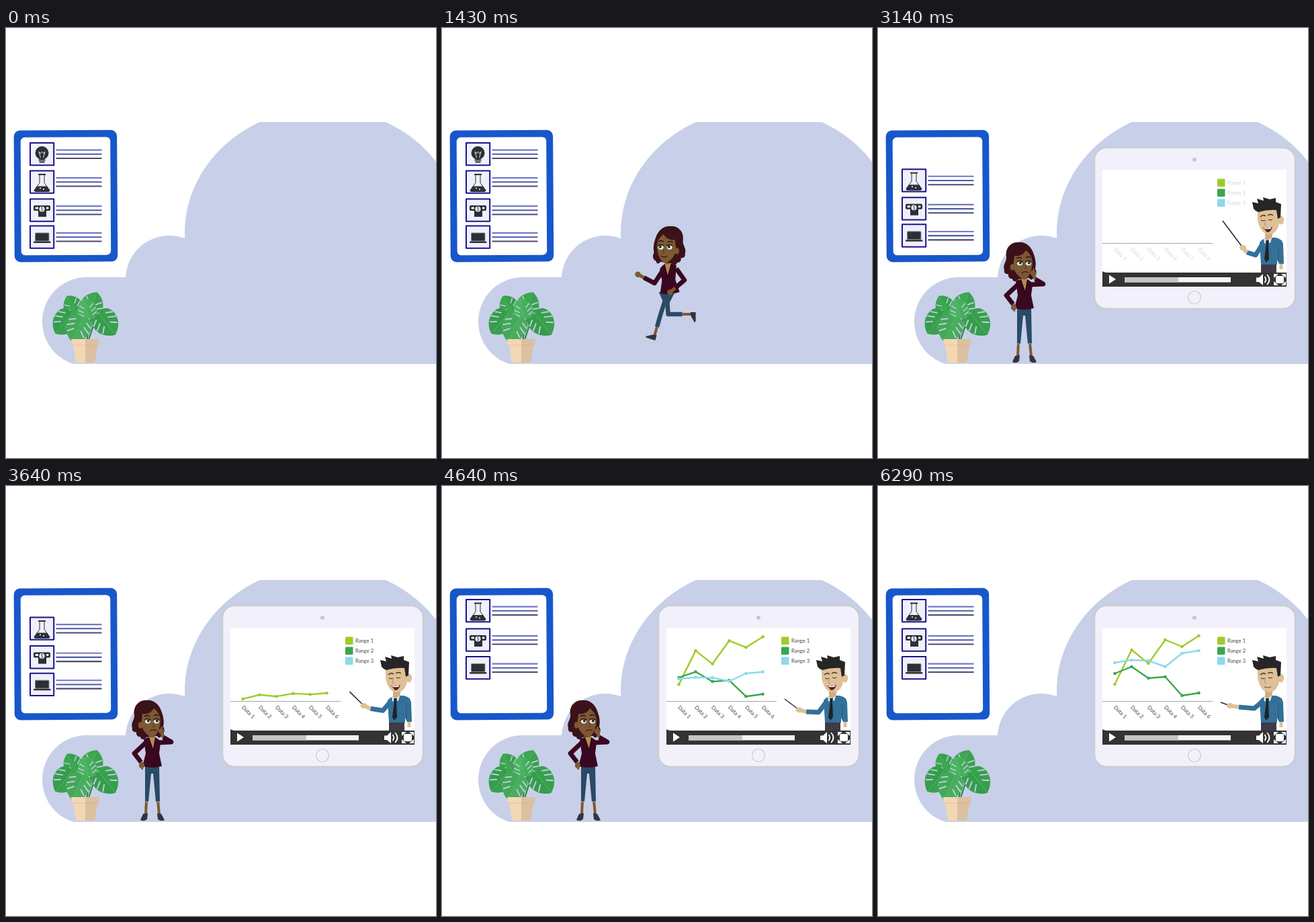
Recreate the animation shown at these times as an HTML page with a canvas. Size 640 by 640 pixels, loop 6.43 s.

```html
<!DOCTYPE html>
<html lang="en">
<head>
<meta charset="utf-8">
<style>
html, body { margin: 0; height: 100%; overflow: hidden; background: #fff; }
canvas { display: block; width: 640px; height: 640px; }
</style>
</head>
<body>
<canvas width="640" height="640"></canvas>
<script>
const LOOP = 6430;
const g = document.querySelector('canvas').getContext('2d');
const CLOUD = '#c7d0e8', INK = '#2b3036', SKIN = '#7d5833', JACKET = '#3a0720',
  JEANS = '#2a4a66', SHOE = '#33343d', HAIR = '#3b1219', SHIRT = '#33709a', TAN = '#dfc097';

const clamp = v => Math.max(0, Math.min(1, v));
const part = (t, from, to) => clamp((t - from) / (to - from));
const smooth = u => (1 - Math.cos(Math.PI * u)) / 2;
const outQuad = u => 1 - (1 - u) ** 2;
const mix = (a, b, u) => Array.isArray(a) ? a.map((v, i) => mix(v, b[i], u)) : a + (b - a) * u;

function fill(d, color) { g.fillStyle = color; g.fill(new Path2D(d)); }
function stroke(d, color, width = 1) {
  g.strokeStyle = color; g.lineWidth = width; g.stroke(new Path2D(d));
}
const limb = (points, color, width) => stroke('M' + points.join('L'), color, width);
function oval(x, y, rx, ry, color) {
  g.beginPath(); g.ellipse(x, y, rx, ry, 0, 0, 7); g.fillStyle = color; g.fill();
}
function box(x, y, w, h, r, color, line, width) {
  g.beginPath(); g.roundRect(x, y, w, h, r);
  if (color) { g.fillStyle = color; g.fill(); }
  if (line) { g.strokeStyle = line; g.lineWidth = width; g.stroke(); }
}
function label(text, x, y, size, color) {
  g.font = size + 'px Lato, sans-serif'; g.fillStyle = color; g.fillText(text, x, y);
}
function at(x, y, draw, { turn = 0, sx = 1, sy = sx, alpha = 1 } = {}) {
  g.save();
  g.translate(x, y); g.rotate(turn * Math.PI / 180); g.scale(sx, sy);
  g.globalAlpha *= alpha;
  draw();
  g.restore();
}
// Interpolates between [time, pose] keys, easing each step.
function poseAt(t, keys) {
  let i = 0;
  while (i < keys.length - 2 && t > keys[i + 1][0]) i++;
  const [a, b] = [keys[i], keys[i + 1]];
  return mix(a[1], b[1], smooth(part(t, a[0], b[0])));
}

function cloud() {
  oval(471.5, 305, 205.5, 185.5, CLOUD);
  oval(243, 374, 65, 65, CLOUD);
  oval(120, 437, 66, 66, CLOUD);
  g.fillRect(120, 371, 520, 129);
}

function leaf(color) {
  fill('M0 0C-8 5-18 0-18-13C-18-26-9-34 0-38C9-34 18-26 18-13C18 0 8 5 0 0Z', color);
  fill('M0 0C8 5 18 0 18-13C18-26 9-34 0-38Z', '#2c8f4630');
  for (const side of [-1, 1]) at(0, 0, () =>
    stroke('M17-10L8-5M17-18L7-12M13-26L5-19', CLOUD, 1.7), { sx: side, sy: 1 });
  stroke('M0 0V-35', '#55b968', .8);
}
function plant() {
  stroke('M117 468L109 425M120 466L128 425M123 464L135 428M114 468L95 440', '#2a7d45', 2);
  const leaves = [
    [106, 425, -30, .8, '#3da650'], [122, 427, 22, .96, '#3da650'],
    [98, 425, 219, 1.02, '#38a04d'], [138, 425, 142, 1.06, '#38a04d'],
    [123, 432, -10, .8, '#4db562'], [114, 431, 203, 1.04, '#48ad5c']];
  for (const [x, y, turn, sx, color] of leaves) at(x, y, () => leaf(color), { turn, sx });
  fill('M97 463H118V498H104L100 472H98Z', '#f3d7b3');
  fill('M118 463H139L138 472H136L132 498H118Z', '#dcc0a0');
  stroke('M99 472H137', '#cbae8c80', 1);
}

const icons = [
  () => {
    oval(17.5, 15, 10, 10, INK);
    stroke('M12.5 25.5H22.5M13.5 28.5H21.5', INK, 2.2);
    stroke('M13 13L15.5 22M22 13L19.5 22M13 13L15 16L17.5 13L20 16L22 13', '#eee', .9);
  },
  () => {
    stroke('M12 5.5H23', INK, 2);
    stroke('M14 6V18L6 29Q6 31 8 31H27Q29 31 29 29L21 18V6', INK, 1);
    fill('M10 23H25L29 29Q29 31 27 31H8Q6 31 6 29Z', INK);
    oval(15, 26, 1, 1, '#fff'); oval(20, 27.5, 1, 1, '#fff');
  },
  () => {
    box(5, 9.5, 25, 8, 2, INK);
    box(7.5, 12, 20, 3, 1, '#f0effa');
    box(12, 11.5, 12, 15, 0, INK);
    oval(17.5, 15, 4, 4, '#fff');
    label('$', 15.4, 17.6, 7.5, INK);
  },
  () => {
    box(7.5, 10.5, 20.5, 12, 1, INK, '#888b92', 1);
    box(5, 23, 25.5, 2.5, 1, INK);
  }];
function item(index, x, y, alpha = 1) {
  at(x, y, () => {
    box(0, 0, 35.2, 33.3, 0, '#f0effa', '#1b1387', 2);
    icons[index]();
    ['#7279c4', '#4c59aa', '#4a496e'].forEach((c, i) =>
      stroke(`M38.5 ${10.6 + i * 6.2}H106.5`, c, 2.1));
  }, { alpha });
}
function clipboard(t) {
  at(89, 250, () => {
    box(-76.8, -97.8, 153.5, 195.8, 9, '#1757cb');
    box(-66.8, -87.5, 133.5, 175.5, 6, '#fff');
  }, { turn: -.35 });
  const rise = smooth(part(t, 2880, 4650));
  [212.5, 254.5, 294.5].forEach((y, i) => item(i + 1, 36, y - rise * (43.5 - 1.5 * i)));
}
function flyingItem(t) {
  const u = part(t, 1745, 2210), k = smooth(u);
  if (u < 1) item(0, 36 + 417 * k, 171 + 105 * k, 1 - part(u, .8, 1));
}

const series = [
  ['#9ecb2a', [25, 76, 56, 91, 81, 97]],
  ['#3aa650', [41, 51, 34, 36, 8, 12]],
  ['#8fd8ea', [57, 61, 60, 51, 71, 75]]];
function chart(t) {
  const alpha = part(t, 3040, 3500);
  stroke('M334 320.5H498', '#a8a8a8', 1.2);
  series.forEach(([color, values], i) => {
    const grow = outQuad(part(t, 3564 + i * 324, 4789 + i * 324));
    box(505, 224.5 + i * 15, 11.5, 11.5, 1, color);
    at(520, 233 + i * 15, () => label('Range ' + (i + 1), 0, 0, 7.7, '#444'), { alpha });
    if (!grow) return;
    const points = values.map((v, n) => [352.5 + n * 25, 320 - v * grow]);
    limb(points, color, 2.4);
    for (const [x, y] of points) oval(x, y, 2.3, 2.3, color);
  });
  for (let n = 0; n < 6; n++) at(350.5 + n * 25, 330, () =>
    label('Data ' + (n + 1), 0, 0, 8, '#444'), { turn: 45, alpha });
}

// Presenter arm: elbow, wrist, hand, pointer tip
const raised = [[562, 338], [549, 334], [543, 327], [513, 287]];
const level = [[560, 331], [537, 329], [524, 327], [510, 322]];
const lowered = [[561, 340], [545, 340], [536, 337], [510, 314]];
const presenterKeys = [[2860, raised], [3350, raised], [3900, level], [4350, level],
  [4850, lowered], [5350, lowered], [5850, level], [6430, level]];
function presenter(t) {
  fill('M570 349H593V364H570Z', '#3f3b45');
  fill('M568 319Q573 313 580 312H592Q602 314 603 322L604 351H597L594 345V352H570Z', SHIRT);
  stroke('M596 325V348', '#285b80', 1);
  limb([[600, 351], [600, 359]], TAN, 5);
  fill('M576 302H588L586 314L580 318L576 313Z', '#cfae84');
  fill('M574 312L580 317L586 312L584 320L579 318L575 321Z', '#e8eef2');
  fill('M577 316H582L581 321L582 344L578 349L575 344L578 321Z', '#1f2226');
  oval(600, 286, 4.2, 6.5, TAN);
  fill('M565 270Q580 266 596 270L598 286Q597 299 589 305Q582 309 575 305Q567 299 565 285Z', TAN);
  fill('M559 269L557 259L566 261L564 254L574 257L573 252L583 255L592 253L592 259L600 262L599 282L595 284L593 271Q580 270 566 274Q561 272 559 269Z', '#262626');
  stroke('M569 281Q573 277 577 280M580 279Q584 276 588 279', '#3a2a20', 1.4);
  stroke('M570 286Q573 288 576 286M581 285Q584 287 587 285', '#3a2a20', 1);
  stroke('M577 286L575 293L578 294', '#b8946a', 1);
  const open = t < 5000 ? Math.abs(Math.cos((t - 3140) * Math.PI / 250)) : 0;
  if (open > .15) {
    fill(`M573 297Q580 299 587 296Q584 ${298 + 7 * open} 579 ${298 + 6 * open}Z`, '#5a2020');
    stroke('M575 298Q580 299.5 585 297.5', '#fff', 1.4);
  } else stroke('M575 299Q580 301 585 299', '#7a4a35', 1.2);
  const [elbow, wrist, hand, tip] = poseAt(t, presenterKeys);
  limb([hand, tip], '#2a2a2e', 1.5);
  limb([[573, 320], elbow, wrist], SHIRT, 7);
  limb([wrist, hand], TAN, 6);
  oval(hand[0], hand[1], 5, 4, TAN);
}
function controls() {
  fill('M334 362Q337 364 343 364H608V386H334Z', '#333');
  fill('M344 367.5V380.5L354 374Z', '#fff');
  box(367, 371, 158, 7.5, 0, '#f4f4f0');
  box(367, 371, 80, 7.5, 0, '#c4c4c4');
  fill('M563 371.5H567L573 366V383L567 378H563Z', '#fff');
  stroke('M575.5 370Q579 374.5 575.5 379M579 367Q586 374.5 579 382', '#fff', 1.8);
  box(592, 369, 12, 11, 2, '#fff');
  fill('M589 366H596L589 372ZM607 366H600L607 372ZM589 383H596L589 377ZM607 383H600L607 377Z', '#fff');
}
function screen(t) {
  if (t < 2860) {
    const press = 1 - .12 * Math.sin(Math.PI * part(t, 2350, 2650));
    at(470, 293, () => {
      oval(0, 0, 29, 29, INK);
      fill('M-10-17V18L17 1Z', '#fff');
    }, { sx: press });
    return;
  }
  g.save();
  g.beginPath(); g.rect(334, 211, 274, 174); g.clip();
  chart(t); presenter(t); controls();
  g.restore();
}
function tablet(t) {
  if (t < 1500) return;
  const sx = t < 1680 ? 1.1 * outQuad(part(t, 1480, 1680)) : 1.1 - .1 * smooth(part(t, 1680, 1820));
  at(471.5, 298, () => {
    g.translate(-471.5, -298);
    box(322, 178, 299, 240, 18, '#f2f1fb', '#cccdd0', 2.5);
    box(334, 211, 274, 174, 0, '#fff');
    oval(471, 196, 3, 3, '#c9c4d4');
    box(461.5, 391.5, 19, 19, 9.5, null, '#cbcbd0', 1.2);
    screen(t);
  }, { sx });
}

function face(mood) {
  fill('M-3-28C-15-29-23-18-21-7C-20 1-27 5-24 13C-25 17-22 20-18 19C-19 24-15 27-12 26C-12 31-5 31-3 27L13 25C15 29 19 28 19 24C24 22 25 16 22 11C24 4 22-6 18-15C13-25 5-29-3-28Z', HAIR);
  fill('M-9-8Q2-6 8-16Q17-10 18 2Q17 15 12 22Q8 28 4 27Q-6 22-11 9Z', SKIN);
  oval(-12, 9, 3.2, 4.8, SKIN);
  stroke('M-6-4Q-2-7 2-4M8-5Q12-8 15-5', '#2a0d10', 1.4);
  for (const x of [-1, 12]) {
    oval(x, 3, 4, 3.6, '#f4f4ee');
    oval(x + .8, 2.6, 2.3, 2.4, '#3f7a63');
    oval(x + .8, 2.6, 1.2, 1.3, '#111');
    stroke(`M${x - 4.5} 1.5Q${x} -2.5 ${x + 4.5} 1.5`, '#1c0a0a', 1.3);
  }
  stroke('M7 6L9 11L6 12', '#573820', 1);
  if (mood === 'happy') {
    fill('M-1 14Q6 16 13 13Q12 21 6 21Q1 20-1 14Z', '#5c1720');
    fill('M0 14.5Q6 16.5 12.5 13.5L11 17Q6 18.5 1.5 17.5Z', '#fff');
  } else stroke(mood === 'puzzled' ? 'M2 18Q6 14 12 17' : 'M2 16Q7 20 12 16', '#4a1c1c', 1.4);
}
function torso() {
  limb([[1, -6], [2, 2]], SKIN, 7);
  fill('M-11 3Q-6 0-2 0L6 0Q13 3 14 8L12 24Q14 34 16 43Q2 47-13 43Q-10 32-8 24Z', JACKET);
  fill('M-3 0H6L3 18Z', '#b58a4c');
  stroke('M-4 0L3 19L7 0', '#24040f', 1);
}
function arm(points) {
  const [hand, finger] = points.slice(-2), sleeve = points.slice(0, -2);
  limb([sleeve.at(-1), hand], SKIN, 5);
  oval(hand[0], hand[1], 4.2, 4.2, SKIN);
  limb([hand, finger], SKIN, 2.6);
  limb(sleeve, JACKET, 6.8);
}

// Standing arms, from shoulder to fingertip: [near, far]
const pointing = [
  [[-8, 8], [-16, 22], [-27, 43], [-32, 54], [-33, 62]],
  [[8, 9], [18, 3], [39, -17], [46, -26], [53, -36]]];
const thinking = [
  [[-8, 8], [-25, 24], [-15, 37], [-14, 42], [-13, 48]],
  [[9, 8], [30, 7], [18, 0], [15, -9], [16, -16]]];
const showing = [thinking[0], [[9, 9], [24, 17], [43, 9], [50, 6], [58, -2]]];
const womanKeys = [[1780, pointing], [2420, pointing], [2640, thinking],
  [4950, thinking], [5120, showing], [6430, showing]];

function standing(t) {
  const [near, far] = poseAt(t, womanKeys);
  stroke('M-7 94L-8 115M10 94L12 115', SKIN, 4);
  fill('M-12 114L-5 113L-6 122Q-11 126-16 123ZM9 113L15 114L20 123Q15 126 10 122Z', SHOE);
  fill('M-9 42H12L13 96H7L3 54H0L-4 96H-9Z', JEANS);
  stroke('M-9 96H-4M7 96H13', '#b8a9b8', 1.2);
  const thoughtful = t > 2420;
  if (!thoughtful) arm(far);
  torso();
  at(thoughtful ? -4 : -8, -27, () => face(t > 5030 ? 'happy' : thoughtful ? 'puzzled' : 'calm'));
  arm(near);
  if (thoughtful) arm(far);
}

const step = ([x, y], deg, length) =>
  [x + length * Math.sin(deg * Math.PI / 180), y + length * Math.cos(deg * Math.PI / 180)];
function runLeg(phase) {
  const thigh = 7 + 38 * Math.sin(phase), shin = thigh - 44 - 44 * Math.cos(phase);
  const hip = [3, 46], knee = step(hip, thigh, 29);
  const cuff = step(knee, shin, 21), ankle = step(knee, shin, 36);
  limb([cuff, ankle], SKIN, 4);
  limb([hip, knee, cuff], JEANS, 6.5);
  at(ankle[0], ankle[1], () => fill('M-3-3L3-2L12 3Q12 5 9 5H-3Z', SHOE), { turn: -shin });
}
function runArm(shoulder, swing) {
  const elbow = step(shoulder, swing, 21), wrist = step(elbow, swing + 85, 18);
  arm([shoulder, elbow, wrist, step(wrist, swing + 85, 10), step(wrist, swing + 85, 14)]);
}
function running(t) {
  const phase = (t - 1430) * 2 * Math.PI / 560 - .3;
  runArm([10, 11], 34 * Math.cos(phase));
  runLeg(phase);
  runLeg(phase + Math.PI);
  fill('M-9 42H15L7 60H0Z', JEANS);
  at(0, 0, torso, { turn: 4 });
  at(0, -28, () => face('calm'));
  runArm([-11, 7], -37 * Math.cos(phase));
}
function woman(t) {
  if (t < 700 || t > 6100) return;
  if (t < 1780) {
    const bob = 2 * Math.sin((t - 1430) * 4 * Math.PI / 560);
    at(338 + (1430 - t) * .33, 351 + bob, () => running(t), { sx: -1, sy: 1 });
  } else at(216, 374, () => standing(t), { alpha: 1 - part(t, 5900, 6100) });
}
function idea(t) {
  if (t < 5000 || t > 5900) return;
  at(248, 334, () => {
    oval(0, 0, 7.8, 8.8, '#fff');
    fill('M-4 6H4L3 12H-3Z', '#f5f6fa');
    stroke('M-2 6L-3-1L0 2L3-1L2 6', '#d5d9e4', .8);
    stroke('M-3 10H3M-2 12.5H2', '#d3d8e2', 1.2);
  }, { sx: outQuad(part(t, 4980, 5130)) });
}

function draw(t) {
  g.fillStyle = '#fff';
  g.fillRect(0, 0, 640, 640);
  g.save();
  g.beginPath(); g.rect(0, 140, 640, 360); g.clip();
  cloud();
  plant();
  clipboard(t);
  tablet(t);
  woman(t);
  idea(t);
  flyingItem(t);
  g.restore();
}

g.lineJoin = 'round';
const start = performance.now();
function frame() {
  draw((performance.now() - start) % LOOP);
  requestAnimationFrame(frame);
}
frame();
</script>
</body>
</html>
```
